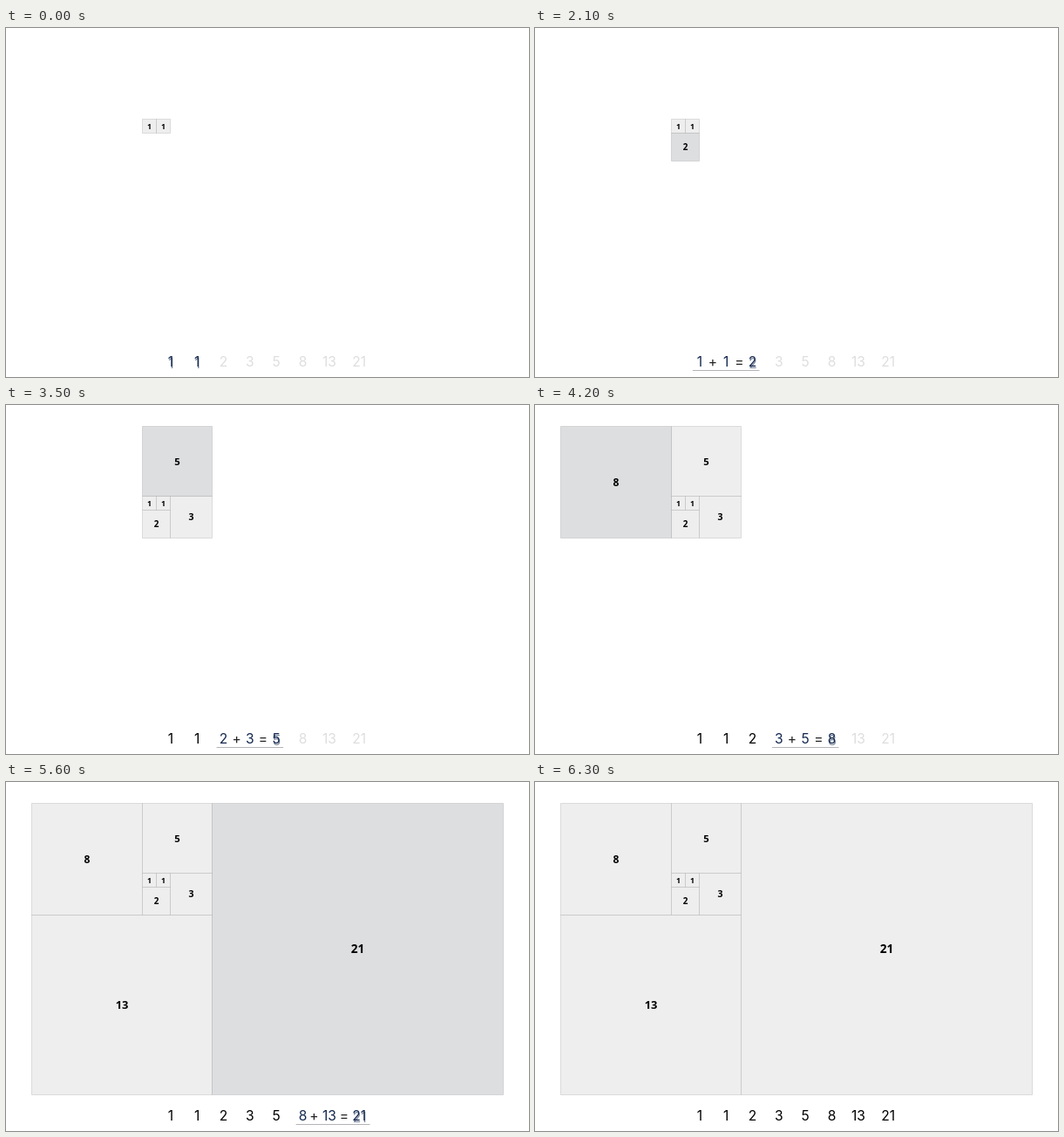
An HTML page that plays this animation: 600 by 400 pixels, repeating every 8400 ms.

```html
<!DOCTYPE html>
<html lang="en">
<head>
<meta charset="utf-8">
<title>Fibonacci squares</title>
<style>
  html, body { margin: 0; width: 100%; height: 100%; overflow: hidden; background: #fff; }
  svg { display: block; width: 100%; height: 100%; }
  text { text-anchor: middle; }
  .label { font-family: "Open Sans", "Noto Sans", sans-serif; font-weight: 700; }
  .row { font-family: Inter, Roboto, sans-serif; font-size: 15.6px; }
</style>
</head>
<body>
<svg id="stage" viewBox="0 0 600 400"></svg>
<script>
const LOOP = 8400, FIRST = 2100, STEP = 700, COUNT = 8;
const UNIT = 15.9, ORIGIN_X = 156.6, ORIGIN_Y = 104.4;
const BASE = 388, PITCH = 30.35, DIGIT = 8.9, MIN_GAP = 16.4, PAD = 3.5;
const NAVY = '#14284f', PALE = '#dedede';

const stage = document.getElementById('stage');

function add(tag, attrs, text) {
  const node = document.createElementNS(stage.namespaceURI, tag);
  for (const name in attrs) node.setAttribute(name, attrs[name]);
  if (text !== undefined) node.textContent = text;
  stage.append(node);
  return node;
}

function show(node, on) {
  node.setAttribute('visibility', on ? 'visible' : 'hidden');
}

const values = [1, 1];
while (values.length < COUNT) values.push(values.at(-1) + values.at(-2));

// Each new square joins the box so far: below, right, above, left, and round again.
const box = { left: 0, top: 0, right: 1, bottom: 1 };
const corners = values.map((n, i) => {
  const side = i === 1 ? 1 : (i + 2) % 4;
  let x = box.left, y = box.top;
  if (i > 0) {
    if (side === 0) { y = box.bottom; box.bottom += n; }
    if (side === 1) { x = box.right; box.right += n; }
    if (side === 2) { y = box.top -= n; }
    if (side === 3) { x = box.left -= n; }
  }
  return [x, y];
});

const snap = (origin, units) => Math.floor(origin + units * UNIT) + 0.5;

const boxes = values.map((n, i) => {
  const [u, v] = corners[i];
  const x = snap(ORIGIN_X, u), width = snap(ORIGIN_X, u + n) - x;
  const y = snap(ORIGIN_Y, v), height = snap(ORIGIN_Y, v + n) - y;
  const size = 8.8 + 1.6 * Math.log(n);
  return {
    rect: add('rect', { x, y, width, height, stroke: '#000', 'stroke-opacity': 0.11 }),
    label: add('text', {
      class: 'label', x: x + width / 2, y: y + height / 2 + size * 0.36, 'font-size': size
    }, n)
  };
});

// Terms keep an even pitch unless wide numbers need more room.
const widths = values.map(n => String(n).length * DIGIT);
const centres = [188.8];
for (let i = 1; i < COUNT; i++) {
  const room = (widths[i - 1] + widths[i]) / 2 + MIN_GAP;
  centres.push(centres[i - 1] + Math.max(PITCH, room));
}
const leftOf = i => centres[i] - widths[i] / 2;
const rightOf = i => centres[i] + widths[i] / 2;
const gapAfter = i => (rightOf(i) + leftOf(i + 1)) / 2;

const ghosts = values.map((n, i) => add('text', {
  class: 'row', x: centres[i] + 0.5, y: BASE + 2.3, fill: NAVY, opacity: 0.55
}, n));
const terms = values.map((n, i) => add('text', { class: 'row', x: centres[i], y: BASE }, n));
const plus = add('text', { class: 'row', y: BASE, fill: '#222' }, '+');
const equals = add('text', { class: 'row', y: BASE, fill: '#222' }, '=');
const rule = add('line', { y1: 392.5, y2: 392.5, stroke: '#b4b4b8' });

// Step 1 is the opening pair, each later step adds one term, step COUNT is the finished figure.
function draw(step) {
  const done = step === COUNT;
  const adding = step > 1 && !done;
  boxes.forEach(({ rect, label }, i) => {
    rect.setAttribute('fill', adding && i === step ? '#dddee0' : '#eeeeee');
    show(rect, i <= step);
    show(label, i <= step);
  });
  terms.forEach((term, i) => {
    const active = !done && i >= step - 2;
    term.setAttribute('fill', i > step ? PALE : active ? NAVY : '#000');
    show(ghosts[i], step === 1 ? i <= 1 : i === step);
  });
  [plus, equals, rule].forEach(node => show(node, adding));
  if (adding) {
    plus.setAttribute('x', gapAfter(step - 2));
    equals.setAttribute('x', gapAfter(step - 1));
    rule.setAttribute('x1', leftOf(step - 2) - PAD);
    rule.setAttribute('x2', rightOf(step) + PAD);
  }
}

let shown = 0;
function tick() {
  const t = performance.now() % LOOP;
  const step = t < FIRST ? 1 : Math.min(COUNT, 2 + Math.floor((t - FIRST) / STEP));
  if (step !== shown) draw(shown = step);
  requestAnimationFrame(tick);
}
tick();
</script>
</body>
</html>
```
